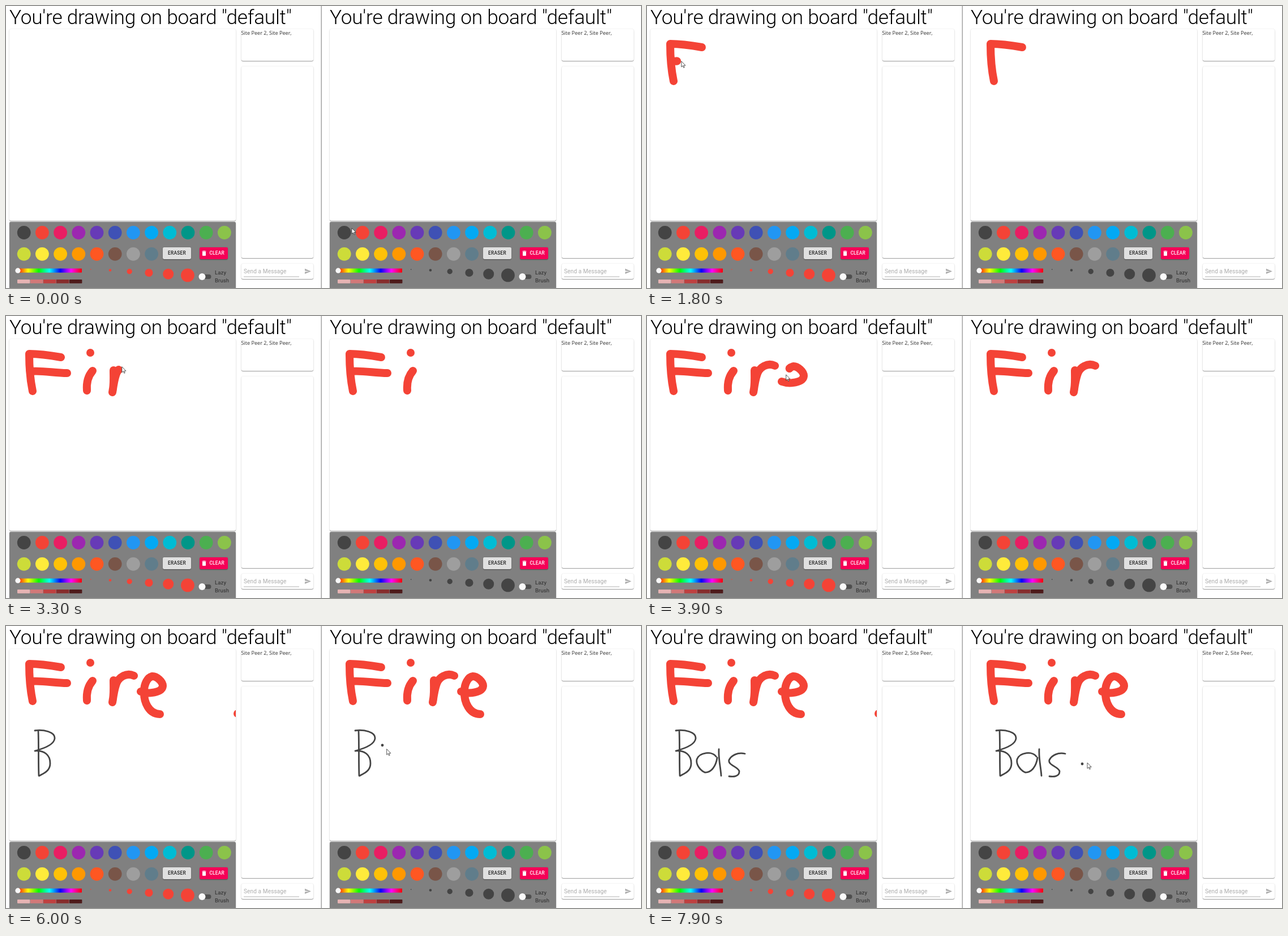
Recreate the animation shown at these times as an HTML page. Size 1122 by 499 pixels, loop 8000 ms.

```html
<!DOCTYPE html>
<html lang="en">
<head>
<meta charset="utf-8">
<title>Shared drawing board</title>
<style>
  html, body { margin: 0; width: 100%; height: 100%; overflow: hidden; background: #fff; }
  #stage { position: relative; width: 1122px; height: 499px; overflow: hidden; }
  #stage > svg { position: absolute; inset: 0; }
  .card {
    position: absolute; border-radius: 2.4px; background: #fff;
    box-shadow: 0 1.2px 1px -.2px rgba(0,0,0,.24), 0 .6px .8px rgba(0,0,0,.16), 0 .6px 2.4px rgba(0,0,0,.18);
  }
  .button { box-shadow: 0 1.6px 1px -.8px rgba(0,0,0,.2), 0 1.2px 1.2px rgba(0,0,0,.14), 0 .6px 3px rgba(0,0,0,.12); }
  text { font-family: Roboto, sans-serif; fill: rgba(0,0,0,.87); white-space: pre; }
  .title { font-size: 35.34px; font-weight: 300; letter-spacing: -.00833em; fill: #000; }
  .users { font-family: "Open Sans", "Noto Sans", sans-serif; font-size: 9.1px; fill: #333; }
  .label { font-size: 9.6px; letter-spacing: .00938em; fill: #2a2a2a; }
  .hint { font-size: 10.1px; letter-spacing: .00938em; fill: #acacac; }
  .caption { font-size: 8.34px; font-weight: 500; letter-spacing: .02857em; }
  .ink path { fill: none; stroke-linecap: round; stroke-linejoin: round; }
</style>
</head>
<body>
<div id="stage"></div>
<script>
const LOOP = 8000, STEP = 100, SHIFT = 566, LEAD = 40, LEAVE = 4150;
const RED = '#f44336', DARK = '#444';
const SIDES = [
  { x: 0, color: RED, radius: 7, width: 14 },
  { x: SHIFT, color: DARK, radius: 2.4, width: 2.8 }
];
const SWATCHES = [
  DARK, RED, '#e91e63', '#9c27b0', '#673ab7', '#3f51b5', '#2196f3', '#03a9f4', '#00bcd4', '#009688',
  '#4caf50', '#8bc34a', '#cddc39', '#ffeb3b', '#ffc107', '#ff9800', '#ff5722', '#795548', '#9e9e9e', '#607d8b'
];

// Strokes in board coordinates; "sync" is when the other board receives them.
const stroke = (side, start, end, d, sync = end + 90) => ({ side, start, end, d, sync });
const STROKES = [
  stroke(0, 950, 1200, 'M41 68 Q41 104 47 133'),
  stroke(0, 1350, 1600, 'M41 67 C60 67 80 70 97 73'),
  stroke(0, 1750, 2080, 'M43 98 C65 96 85 101 108 101'),
  stroke(0, 2250, 2450, 'M153 97 C145 106 142 119 143 132'),
  stroke(0, 2600, 2640, 'M149 65 h.01'),
  stroke(0, 2900, 3450, 'M190 96 C190 110 191 122 188 135 C190 122 191 114 194 105 C198 90 213 82 226 88'),
  stroke(0, 3650, 4150, 'M238 116 C252 121 276 118 277 106 C277 98 266 89 259 89 C250 90 244 103 244 115 C243 135 253 156 272 156'),
  stroke(1, 4850, 5050, 'M57 186 C58 210 57 240 58 265', 5560),
  stroke(1, 5130, 5480, 'M51 185 C66 183 87 187 86 199 C85 210 66 217 51 221 C68 220 78 228 78 243 C78 257 66 261 59 265'),
  stroke(1, 6120, 6600, 'M122 231 C115 221 93 223 88 236 C86 246 95 256 102 259 C114 260 122 247 124 233'),
  stroke(1, 6700, 6850, 'M127 218 C126 235 130 250 131 265'),
  stroke(1, 7000, 7350, 'M173 226 C160 223 149 229 145 237 C142 246 161 249 163 257 C163 267 152 267 145 266')
];

// Pointer stops between strokes: time, x, y on the stage.
const STOPS = [
  [0, 611, 393], [100, 611, 393], [800, 29, 78], [2800, 197, 104],
  [4250, 409, 155], [4450, 614, 199], [4600, 617, 201], [4720, 618, 200],
  [6000, 665, 211], [7900, 769, 244], [7940, 778, 242], [8100, 800, 240]
];

const stage = document.getElementById('stage');
const circle = (x, y, r, fill) => `<circle cx="${x}" cy="${y}" r="${r}" fill="${fill}"/>`;
const rect = (x, y, w, h, fill, rx = 0) =>
  `<rect x="${x}" y="${y}" width="${w}" height="${h}" rx="${rx}" fill="${fill}"/>`;
const label = (x, y, cls, content, extra = '') => `<text x="${x}" y="${y}" class="${cls}" ${extra}>${content}</text>`;
const card = (x, y, w, h, fill = '#fff', cls = '') =>
  `<div class="card ${cls}" style="left:${x}px;top:${y}px;width:${w}px;height:${h}px;background:${fill}"></div>`;

function cards({ x }) {
  return card(x + 6, 41, 400, 339)
    + card(x + 416, 41, 126.5, 56)
    + card(x + 416, 107, 126.5, 338.6)
    + card(x + 416, 456, 126.5, 27)
    + card(x + 6, 381.5, 400, 130, '#808080')
    + card(x + 277, 427, 50, 21, '#e0e0e0', 'button')
    + card(x + 341.5, 427, 50, 21, '#f50057', 'button');
}

function tools({ color }) {
  const swatches = SWATCHES.map((fill, i) =>
    circle(31.7 + 32.2 * (i % 12), i < 12 ? 401 : 438.8, 11.9, fill)).join('');
  const shades = [80, 65, 50, 35, 20].map((light, i) =>
    rect(20 + 23 * i, 484, 22.4, 6.7, `hsl(0 50% ${light}%)`, i % 4 ? 0 : 1)).join('');
  const sizes = [.8, 2.3, 4.7, 7.1, 9.5, 11.9].map((r, i) =>
    circle(149.7 + 34.25 * i, 465.4 + r * .93, r, color)).join('');
  return swatches + shades + sizes
    + rect(20, 464.6, 114, 7.2, 'url(#hues)', 1) + circle(21, 468.2, 4.6, '#f8f8f8')
    + rect(342, 475, 20.5, 8, '#4f4f4f', 4) + circle(346.5, 479, 6, '#fafafa')
    + label(369, 475, 'label', 'Lazy') + label(369, 489.3, 'label', 'Brush')
    + label(302, 440.4, 'caption', 'ERASER', 'text-anchor="middle"')
    + label(359.4, 440.4, 'caption', 'CLEAR', 'style="fill:#fff"')
    + '<path transform="translate(344 431.5) scale(.5)" fill="#fff" d="M6 19c0 1.1.9 2 2 2h8c1.1 0 2-.9 2-2V7H6zM19 4h-3.5l-1-1h-5l-1 1H5v2h14z"/>';
}

function panel(side) {
  const ink = STROKES.map(s => {
    const { color, width } = SIDES[s.side];
    return `<path d="${s.d}" stroke="${color}" stroke-width="${width}"/>`;
  }).join('');
  return `<g transform="translate(${side.x})">`
    + label(6, 32, 'title', 'You\'re drawing on board "default"')
    + label(415.5, 51, 'users', 'Site Peer 2, Site Peer,')
    + label(420, 473, 'hint', 'Send a Message')
    + rect(420, 478.7, 98, .7, '#8f8f8f')
    + '<path transform="translate(527 463.2) scale(.52)" fill="#adadad" d="M2 21L23 12 2 3v7l15 2-15 2z"/>'
    + tools(side)
    + `<g class="ink" clip-path="url(#board)">${ink}${circle(0, 0, side.radius, side.color)}</g></g>`;
}

const hues = ['#f00', '#ff0', '#0f0', '#0ff', '#00f', '#f0f', '#f00']
  .map((c, i) => `<stop offset="${i / 6}" stop-color="${c}"/>`).join('');
stage.innerHTML = SIDES.map(cards).join('') + `
  <svg width="1122" height="499" viewBox="0 0 1122 499">
    <defs>
      <linearGradient id="hues">${hues}</linearGradient>
      <clipPath id="board"><rect x="6" y="41" width="400" height="339"/></clipPath>
    </defs>
    ${rect(556.6, 0, 1.2, 499, '#8c8c8c')}
    ${SIDES.map(panel).join('')}
    <path id="cursor" d="M0 0V10.2L2.3 8 4 11.6 5.5 10.9 3.9 7.5H7.2Z" fill="#fff" stroke="#222" stroke-width=".75"/>
  </svg>`;

const layers = [...document.querySelectorAll('.ink')];
const inks = layers.map(layer => [...layer.querySelectorAll('path')]);
const dots = layers.map(layer => layer.querySelector('circle'));
const cursor = document.getElementById('cursor');

STROKES.forEach((s, i) => {
  s.path = inks[s.side][i];
  s.length = s.path.getTotalLength();
});

function pointOn(s, part) {
  const p = s.path.getPointAtLength(s.length * part);
  return { x: p.x + SIDES[s.side].x, y: p.y };
}

const route = [
  ...STOPS.map(([time, x, y]) => ({ time, x, y })),
  ...STROKES.flatMap(s => [
    { time: s.start, ...pointOn(s, 0) },
    { time: s.end, ...pointOn(s, 1) }
  ])
].sort((a, b) => a.time - b.time);

function brushAt(t) {
  const active = STROKES.find(s => t >= s.start && t <= s.end);
  if (active) return pointOn(active, (t - active.start) / (active.end - active.start));
  const next = route.findIndex(p => p.time > t);
  const a = route[next - 1], b = route[next];
  const k = (t - a.time) / (b.time - a.time);
  return { x: a.x + (b.x - a.x) * k, y: a.y + (b.y - a.y) * k };
}

const place = (node, x, y) => node.setAttribute('transform', `translate(${x} ${y})`);
const show = (node, visible) => node.setAttribute('visibility', visible ? 'visible' : 'hidden');

function draw(t) {
  STROKES.forEach((s, i) => {
    const part = Math.min(1, Math.max(0, (t - s.start) / (s.end - s.start)));
    s.path.setAttribute('stroke-dasharray', part < 1 ? `${s.length * part} ${s.length * 2}` : 'none');
    show(s.path, t >= s.start);
    show(inks[1 - s.side][i], t >= s.sync);
  });

  const brush = brushAt(t), tip = brushAt(t + LEAD);
  // The left preview stays where the pointer left the board.
  const left = t > LEAVE && brush.x > 409 ? { x: 409, y: 155 } : brush;
  place(dots[0], left.x, left.y);
  place(dots[1], brush.x - SHIFT, brush.y);
  show(dots[1], t > LEAVE);
  place(cursor, tip.x, tip.y);
}

function tick(now) {
  draw(Math.floor((now % LOOP) / STEP) * STEP);
  requestAnimationFrame(tick);
}
draw(0);
requestAnimationFrame(tick);
</script>
</body>
</html>
```
